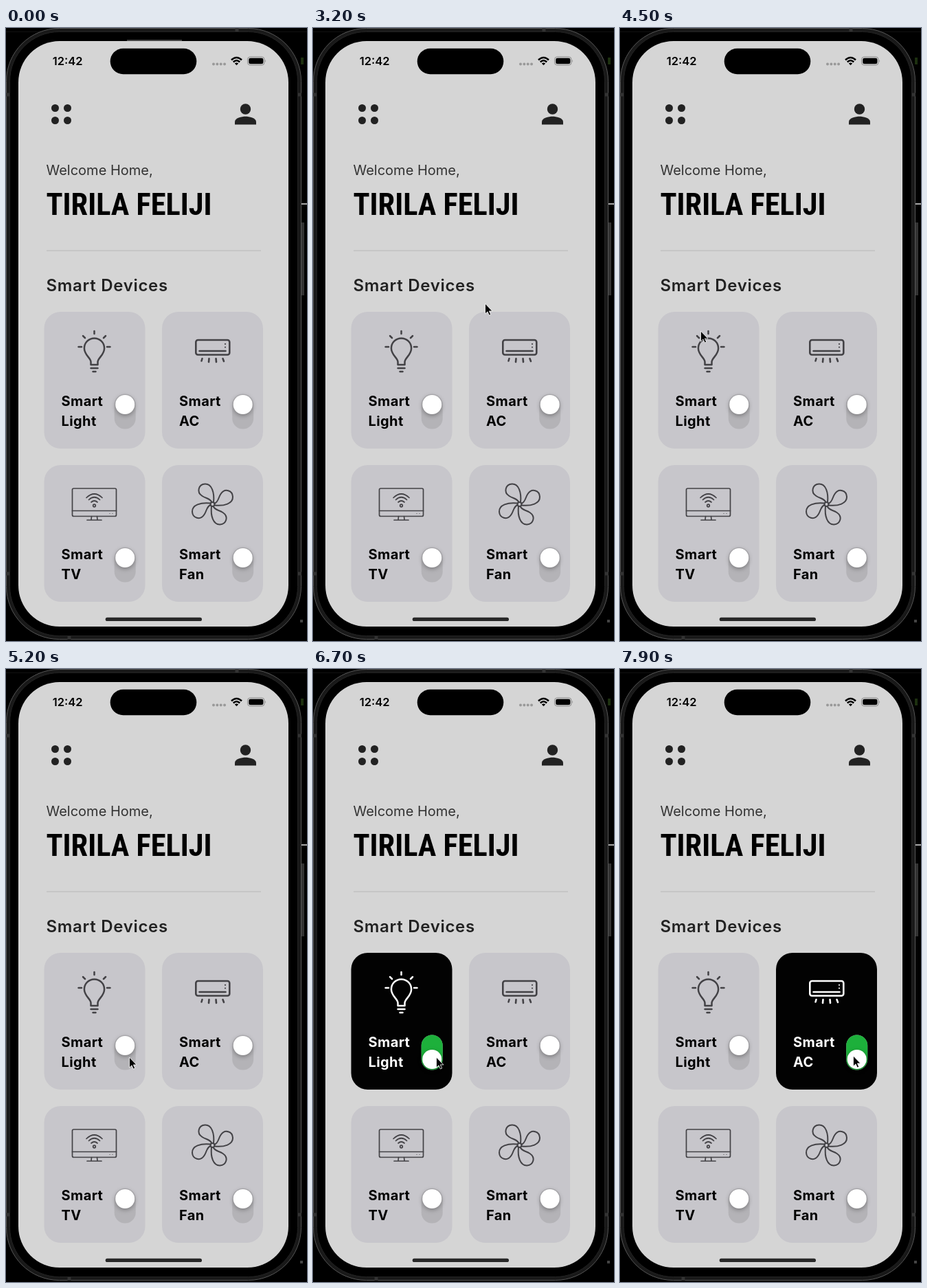
Animation, 438 px wide and 892 px high, one loop 8000 ms. Source, as an HTML page:

```html
<!DOCTYPE html>
<html lang="en">
<head>
<meta charset="utf-8">
<title>Smart home</title>
<style>
html, body { margin: 0; width: 100%; height: 100%; overflow: hidden; background: #000; }
svg { display: block; width: 438px; height: 892px; font-family: Inter, Roboto, sans-serif; }
.name { font: 800 50px "Roboto Condensed", "Open Sans Condensed", "Noto Sans", sans-serif; font-stretch: 62.5%; }
.card { --ink: #434246; --label: #000; --face: #c7c6cb; }
.card.on { --ink: #fff; --label: #fff; --face: #020202; }
.face { fill: var(--face); }
.icon { fill: none; stroke: var(--ink); stroke-linecap: round; stroke-linejoin: round; }
.label { fill: var(--label); font-size: 20px; font-weight: 700; letter-spacing: .4px; }
.knob { fill: #fff; filter: drop-shadow(0 2px 3px #0005); }
</style>
</head>
<body>
<svg viewBox="0 0 438 892">
  <defs>
    <g id="bulb" stroke-width="2.5">
      <path d="M68 77V73C68 67 58.400 63 58.400 53A14.600 14.600 0 0 1 87.600 53C87.600 63 78 67 78 73V77ZM68 82H78M71 87H75M73 28V32M56.500 35L59.500 38M89.500 35L86.500 38M50 51H54.500M91.500 51H96"/>
    </g>
    <g id="ac" stroke-width="2.600">
      <rect x="49.300" y="41" width="49" height="21.500" rx="3"/>
      <path d="M54.500 57H92.500M58.500 68L57.500 71.500M68.500 68L68 73M78.500 68L79 73M88.500 68L90 72"/>
      <path d="M92 46.800h.01M92 51.500h.01" stroke-width="2.200"/>
    </g>
    <g id="tv" stroke-width="1.700" transform="translate(-.5 -.5)">
      <rect x="41.500" y="34.500" width="64" height="40.500" rx="2"/>
      <path d="M41.500 67H105.500M69.500 75L69 80M77.500 75L78 80M63 80.500H84"/>
      <path d="M96 71h.01M100 71h.01" stroke-width="1.200"/>
      <path d="M69 54.500Q73.500 50.500 78 54.500M65.500 51Q73.500 43.500 81.500 51M62 48Q73.500 37 85 48"/>
      <circle cx="73.500" cy="59.500" r="1.800"/>
    </g>
    <path id="blade" d="M-1 -3C-4 -9 -9 -8 -15 -12C-24 -18 -20 -29 -11 -29.500C-1 -30 3 -17 1.500 -3"/>
    <g id="fan" stroke-width="2" transform="translate(73.500 57)">
      <circle r="3"/>
      <use href="#blade"/><use href="#blade" transform="rotate(90)"/>
      <use href="#blade" transform="rotate(180)"/><use href="#blade" transform="rotate(270)"/>
    </g>
  </defs>

  <!-- Window edges behind the phone -->
  <path d="M0 5.500H438" stroke="#111"/>
  <path d="M0 100H5V793H0Z" fill="#2a2a2a"/>
  <path d="M429 43h4v10h-4z" fill="#1d3010"/>
  <path d="M429 283h5v106h-5z" fill="#333"/>
  <path d="M430 256H438" stroke="#aaa" stroke-width="2"/>
  <path d="M428 861h4v4h-4z" fill="#444"/>

  <!-- Phone -->
  <rect x=".5" y=".5" width="429" height="889" rx="77" fill="#191919" stroke="#565656"/>
  <path d="M0 97H6M424 97H430M0 794H6M424 794H430M336 0V6M92 884V890" stroke="#333" stroke-width="5"/>
  <rect x="5.500" y="5.500" width="419" height="879" rx="72" fill="#000" stroke="#242424"/>
  <path id="earpiece" d="M176 18H256" stroke="#444" stroke-width="2"/>
  <rect x="18" y="19" width="393" height="852" rx="60" fill="#d5d5d5"/>
  <rect x="151.700" y="29.700" width="125.600" height="37.600" rx="18.800"/>
  <rect x="144.700" y="857.700" width="140.300" height="5.300" rx="2.600" fill="#282828"/>

  <!-- Status bar -->
  <text x="67.800" y="54" font-size="16.500" font-weight="600">12:42</text>
  <path d="M302 52.500H319" stroke="#999" stroke-width="4" stroke-linecap="round" stroke-dasharray="0 5.350"/>
  <path d="M328 46.500Q335.500 39.500 343 46.500M330.800 49.500Q335.500 45 340.200 49.500" fill="none" stroke="#000" stroke-width="2.600"/>
  <path d="M332.800 51.600Q335.500 49.500 338.200 51.600L335.500 54.300Z"/>
  <rect x="351.500" y="42" width="24.500" height="12" rx="3.800" fill="none" stroke="#8a8a8a"/>
  <rect x="353.200" y="43.700" width="21.200" height="8.600" rx="2.400"/>
  <path d="M377.400 46Q379 48 377.400 50Z" fill="#8a8a8a"/>

  <!-- Header -->
  <g fill="#222">
    <circle cx="71.500" cy="116.500" r="5.500"/><circle cx="89.500" cy="116.500" r="5.500"/>
    <circle cx="71.500" cy="134.500" r="5.500"/><circle cx="89.500" cy="134.500" r="5.500"/>
    <circle cx="348.500" cy="118" r="7.700"/>
    <path d="M333 140.500V136.500C333 131 343 128.800 348.500 128.800S364 131 364 136.500V140.500Z"/>
    <text x="58.500" y="214" font-size="20" fill="#333">Welcome Home,</text>
    <text x="58.500" y="383" font-size="24" font-weight="600" letter-spacing=".7">Smart Devices</text>
  </g>
  <text class="name" id="owner" x="58.500" y="272">TIRILA FELIJI</text>
  <path d="M59 324H371" stroke="#c2c2c2" stroke-width="1.500"/>

  <g id="cards"></g>
  <path id="cursor" d="M.5 1V16L4 12.800L6.300 18L8.700 17L6.400 11.900H11Z" stroke="#fff" stroke-width=".8"/>
</svg>
<script>
const LOOP = 8000, STEP = 100, SLIDE = 300;
const $ = id => document.getElementById(id);

const devices = [
  { name: 'Light', icon: 'bulb', x: 55.5, y: 413, on: 5600, off: 6800 },
  { name: 'AC', icon: 'ac', x: 227, y: 413, on: 7600, off: Infinity },
  { name: 'TV', icon: 'tv', x: 55.5, y: 636 },
  { name: 'Fan', icon: 'fan', x: 227, y: 636 }
];

// Pointer stops: time, x, y
const path = [
  [2900, 400, 330], [3200, 250, 400], [3500, 73, 480], [3700, 85, 524],
  [3900, 160, 408], [4200, 185, 246], [4400, 84, 380], [4600, 150, 500],
  [5000, 176, 561], [5200, 179, 564], [6800, 179, 564], [7100, 334, 560],
  [7300, 334, 560], [7500, 339, 562]
];

$('cards').innerHTML = devices.map(d => `
  <g class="card" transform="translate(${d.x} ${d.y})">
    <rect class="face" width="147" height="199" rx="24"/>
    <g class="icon"><use href="#${d.icon}"/></g>
    <text class="label" x="25" y="137">Smart</text>
    <text class="label" x="25" y="166">${d.name}</text>
    <rect x="102.200" y="119.500" width="31" height="51" rx="15.500" fill="#b4b3b7"/>
    <rect class="lit" x="102.200" y="119.500" width="31" height="51" rx="15.500" fill="#1db03b"/>
    <circle class="knob" cx="117.700" r="14"/>
  </g>`).join('');
devices.forEach((d, i) => d.el = $('cards').children[i]);

// Pick the largest type size that keeps the name on its line
const owner = $('owner');
owner.style.fontSize = Math.min(50, 50 * 241 / owner.getComputedTextLength()) + 'px';

const clamp = p => Math.max(0, Math.min(1, p));
const ease = p => p * p * (3 - 2 * p);
const slide = (t, start) => ease(clamp((t - start + STEP) / SLIDE));

function pointAt(t) {
  const i = path.findIndex(p => p[0] > t);
  if (i < 0) return path[path.length - 1].slice(1);
  const [a, b] = [path[i - 1], path[i]];
  const k = (t - a[0]) / (b[0] - a[0]);
  return [1, 2].map(j => a[j] + (b[j] - a[j]) * k);
}

function draw(t) {
  for (const { el, on, off } of devices) {
    const level = on ? slide(t, on) - slide(t, off) : 0;
    el.classList.toggle('on', t >= on && t < off);
    el.querySelector('.lit').style.opacity = level;
    el.querySelector('.knob').setAttribute('cy', 135 + 20 * level);
  }
  $('earpiece').style.opacity = clamp((2200 - t) / SLIDE);
  const shown = t >= path[0][0];
  $('cursor').style.display = shown ? '' : 'none';
  if (shown) $('cursor').setAttribute('transform', `translate(${pointAt(t)})`);
}

const start = performance.now();
function tick() {
  const t = (performance.now() - start) % LOOP;
  draw(Math.floor(t / STEP) * STEP);
  requestAnimationFrame(tick);
}
tick();
</script>
</body>
</html>
```
